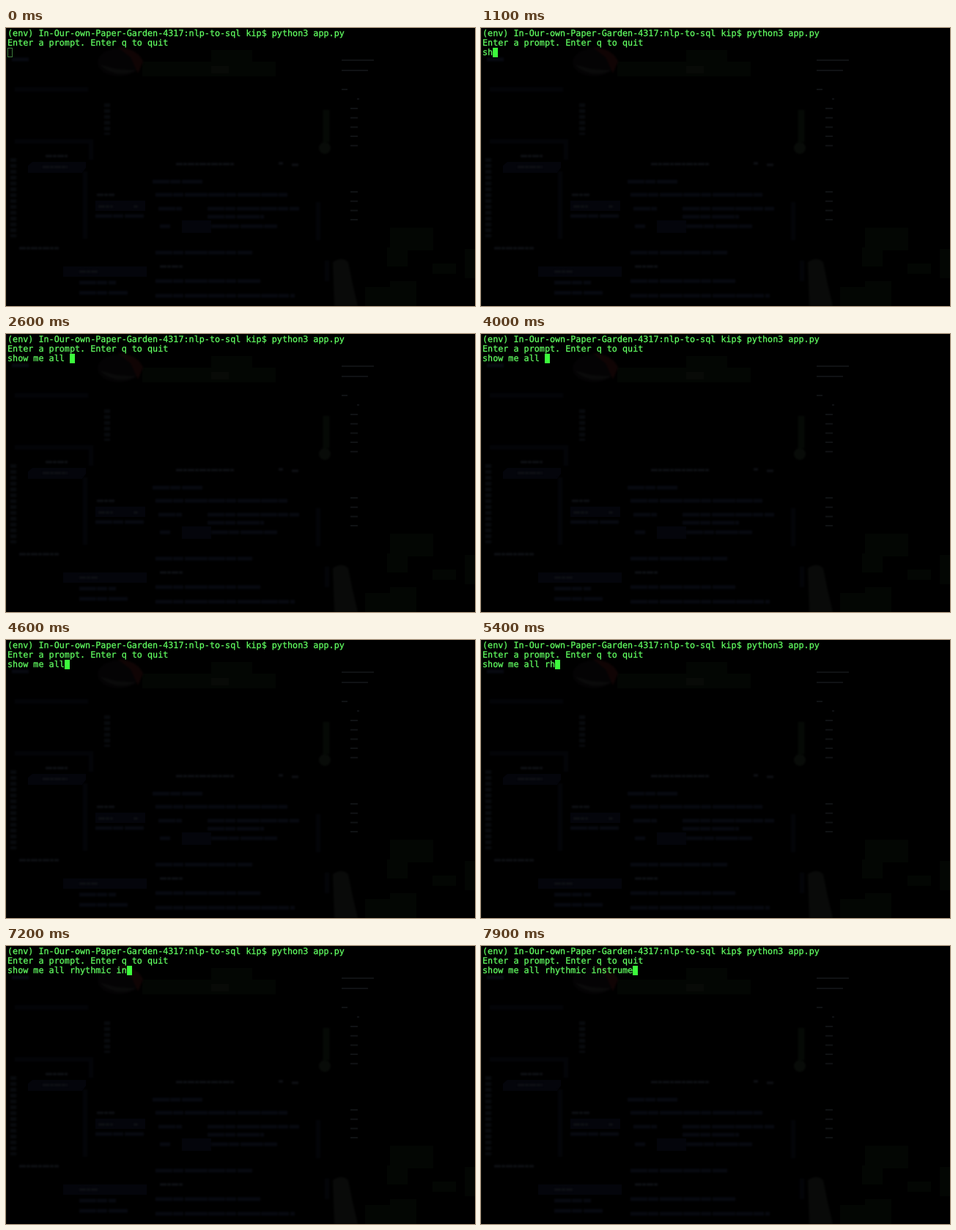
Recreate the animation shown at these times as an HTML page. Size 640 px wide and 380 px high, loop 8 s.

```html
<!DOCTYPE html>
<html lang="en">
<head>
<meta charset="utf-8">
<title>Terminal prompt</title>
<style>
  html, body { margin: 0; width: 100%; height: 100%; overflow: hidden; background: #000; }
  .stage { position: relative; width: 640px; height: 380px; overflow: hidden; background: #000; }
  svg { position: absolute; inset: 0; }
  .soft { filter: blur(.8px); }
  .row {
    position: absolute; left: 2px; height: 14px; white-space: pre;
    font: 11.75px/14px "DejaVu Sans Mono", "Liberation Mono", monospace;
    text-rendering: geometricPrecision;
    color: #62ff62; -webkit-text-stroke: .25px #62ff62;
  }
  .row:nth-of-type(2) { top: 13px; }
  .row:nth-of-type(3) { top: 26px; display: flex; }
  .typed { overflow: hidden; animation: type 8s -5ms step-end infinite; }
  .cursor {
    box-sizing: border-box; width: 7px; height: 13px; margin-top: 1px;
    border: 1px solid #3cfb3c; background: #3cfb3c;
    animation: focus 8s -5ms step-end infinite;
  }
  @keyframes focus {
    0% { background: transparent; border-color: #3b7a3b; }
    6.25%, 100% { background: #3cfb3c; border-color: #3cfb3c; }
  }
  /* 1.25% = 100 ms, one key press */
  @keyframes type {
    0% { width: 0ch; }
    11.25% { width: 0ch; animation-timing-function: steps(5); }
    17.5% { width: 5ch; }
    18.75% { width: 5ch; animation-timing-function: steps(7); }
    27.5% { width: 12ch; }
    40% { width: 13ch; }
    41.25% { width: 14ch; }
    50% { width: 12ch; }
    52.5% { width: 11ch; }
    61.25% { width: 12ch; }
    65% { width: 13ch; }
    67.5% { width: 14ch; }
    68.75% { width: 15ch; }
    75% { width: 16ch; }
    76.25% { width: 17ch; }
    82.5% { width: 17ch; animation-timing-function: steps(10); }
    95% { width: 27ch; }
    97.5% { width: 28ch; }
    98.75%, 100% { width: 29ch; }
  }
</style>
</head>
<body>
<div class="stage">
  <!-- dim windows showing through the terminal -->
  <svg width="640" height="380" viewBox="0 0 640 380" fill="none">
    <g fill="#030603">
      <path d="M186 46H280V30H336V46H368V66H186z" />
      <path d="M524 273H583V304H548V326H520V300H524z" />
      <path d="M582 322H614V336H582z" />
      <path d="M626 302H640V342H626z" />
      <path d="M490 354H524V346H560V380H490z" />
    </g>
    <path d="M280 52H304V62H280z" fill="#080a07" />
    <g class="soft">
      <ellipse cx="154" cy="47" rx="29" ry="19" fill="#040304" />
      <path d="M128 50Q148 70 178 58L150 56z" fill="#0a0a0a" />
      <path d="M152 26Q180 28 187 46L180 62L170 40z" fill="#100404" />
      <path d="M437 112V156" stroke="#050905" stroke-width="9" />
      <circle cx="435" cy="164" r="8" fill="#080b08" />
      <path d="M446 320Q458 312 467 320L473 350L480 380H448z" fill="#090a09" />
    </g>
    <g fill="#04050b">
      <path d="M36 183H109V191L104 198H30V188z" />
      <path d="M122 236H190V250H122z" />
      <path d="M78 326H192V340H78z" />
      <path d="M240 263H280V280H240z" />
    </g>
    <g class="soft" stroke="#030408" stroke-width="6">
      <path d="M12 84H112M12 155H116V180M108 196V288M426 238V290M438 318V346" />
    </g>
    <g class="soft" stroke="#070910" stroke-width="5" stroke-dasharray="23 1 14 2 31 1">
      <path d="M200 210H268M204 228H384M208 247H240M275 247H400M275 258H352" />
      <path d="M210 271H224M280 271H370M204 307H336M204 346H348M204 366H394" />
      <path d="M122 257H188M100 348H150M100 362H166M8 43H32" />
    </g>
    <g class="soft" stroke="#0f1116" stroke-width="3" stroke-dasharray="9 1 5 1">
      <path d="M54 175H84M50 190H84M124 228H148M126 244H146M174 244H180M100 333H126M210 326H242M18 301H72" />
      <path d="M232 186H312M372 185H378M390 187H400" />
    </g>
    <path class="soft" d="M138 103V146M10 178V286" stroke="#080a0d" stroke-width="8" stroke-dasharray="5 3" />
    <g stroke="#101214" stroke-width="2">
      <path d="M458 44H502M458 58H494M458 84H466M479 97H482" />
      <path d="M475 109V163M475 223V264" stroke-width="10" stroke-dasharray="2 10.7" />
    </g>
    <path d="M.5 0V380" stroke="#0a0c09" />
  </svg>
  <div class="row">(env) In-Our-own-Paper-Garden-4317:nlp-to-sql kip$ python3 app.py</div>
  <div class="row">Enter a prompt. Enter q to quit</div>
  <div class="row"><span class="typed">show me all rhythmic instruments</span><span class="cursor"></span></div>
</div>
</body>
</html>
```
